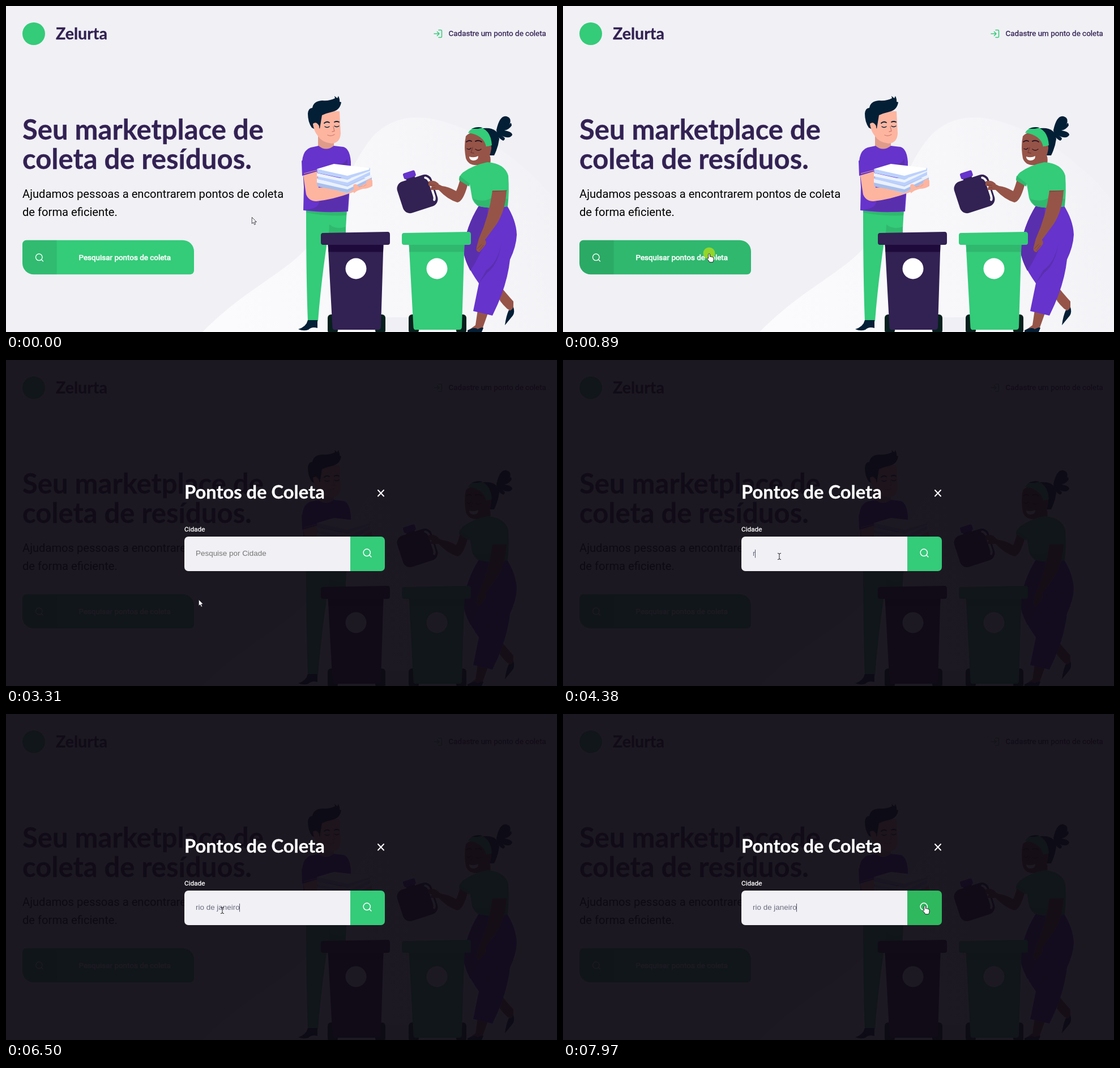
Write an HTML page that moves like this. It is 973 px wide and 576 px high and loops after 8000 ms.

```html
<!DOCTYPE html>
<html lang="pt-BR">
<head>
<meta charset="utf-8">
<title>Pontos de coleta</title>
<style>
  html, body { margin: 0; width: 100%; height: 100%; overflow: hidden; background: #f0f0f5; }
  svg { display: block; width: 100%; height: 100%; }
  text { font-family: Roboto, sans-serif; white-space: pre; }
  .title { font-family: Lato, sans-serif; font-weight: 700; fill: currentColor; stroke: currentColor; stroke-width: .3; }
  .medium { fill: currentColor; stroke: currentColor; stroke-width: .3; }
  .field { font: 13.44px "Liberation Sans", Arial, sans-serif; }
  .line { fill: none; stroke-linecap: round; stroke-linejoin: round; }
  .purple { fill: #6633cc; } .purple-dark { fill: #5a2fae; }
  .green { fill: #34cb79; } .green-dark { fill: #30b86e; }
  .plum { fill: #322153; } .navy { fill: #031f36; }
  .skin { fill: #fdb5a0; } .skin-dark { fill: #df9c8b; }
  .brown { fill: #965448; }
</style>
</head>
<body>
<svg viewBox="0 0 973 576" preserveAspectRatio="none">
  <defs>
    <linearGradient id="glow" x1="0" y1=".6" x2="1" y2=".4">
      <stop offset="0" stop-color="#fbfbfd"/>
      <stop offset=".6" stop-color="#f7f7fa"/>
      <stop offset="1" stop-color="#f2f2f6"/>
    </linearGradient>
    <g id="magnifier" class="line" stroke="#fff" stroke-width="1.4">
      <circle cx="-.7" cy="-.7" r="5.8"/><path d="M3.5 3.5 6.5 6.5"/>
    </g>
  </defs>

  <rect width="973" height="576" fill="#f0f0f5"/>
  <path fill="url(#glow)" d="M347 576C402 520 450 494 500 456C595 382 592 290 652 226C679 201 706 196 730 197C800 200 895 252 973 346V576Z"/>
  <rect x="665" y="550" width="50" height="26" fill="#efeff5"/>

  <!-- header -->
  <circle class="green" cx="49" cy="49" r="20"/>
  <text class="title" x="88" y="59" font-size="28.6" color="#322153">Zelurta</text>
  <path class="line" stroke="#34cb79" stroke-width="1.5" d="M764 42.5H768Q769.5 42.5 769.5 44V54Q769.5 55.5 768 55.5H764M756 49H765M761.5 45.5 765 49 761.5 52.5"/>
  <text class="medium" x="781.5" y="53" font-size="13.44" color="#322153">Cadastre um ponto de coleta</text>

  <!-- pitch -->
  <g font-size="49" color="#322153">
    <text class="title" x="29" y="236">Seu marketplace de</text>
    <text class="title" x="29" y="288">coleta de resíduos.</text>
  </g>
  <g font-size="20.16">
    <text x="29" y="339">Ajudamos pessoas a encontrarem pontos de coleta</text>
    <text x="29" y="371">de forma eficiente.</text>
  </g>
  <path id="searchButton" d="M36 413.7H312A20 20 0 0 1 332 433.700V467.300A7 7 0 0 1 325 474.300H49A20 20 0 0 1 29 454.300V420.700A7 7 0 0 1 36 413.700Z"/>
  <path fill="#000" opacity=".08" d="M36 413.700H89.500V474.300H49A20 20 0 0 1 29 454.300V420.700A7 7 0 0 1 36 413.700Z"/>
  <use href="#magnifier" x="59" y="444.5"/>
  <text class="medium" x="128.5" y="449" font-size="13.44" color="#fff" style="stroke-width:.6">Pesquisar pontos de coleta</text>

  <!-- man -->
  <g>
    <path class="green" d="M530 359H602L599 410H568Q556 490 551 557H533Q530 480 530 359Z"/>
    <path class="green-dark" d="M530 360H602L601 370Q565 372 530 365Z"/>
    <path class="green-dark" d="M571 386Q583 396 600 390V402H570Z"/>
    <path class="navy" d="M533 555H550V569Q540 566 534 572Q525 575 516 571Q530 567 533 555Z"/>
    <path class="skin-dark" d="M551 228H579V249Q566 260 551 249Z"/>
    <path class="skin" d="M545 196Q560 184 589 186L591 225Q590 242 575 243Q558 241 551 230Q538 214 545 196Z"/>
    <path class="navy" d="M540 215Q533 205 533 190Q534 180 541 180Q543 168 558 167Q572 168 581 163L580 159L585 163L587 159Q590 166 589 169L592 170Q590 184 576 187Q567 189 558 193L554 217Q550 207 544 207V217Z"/>
    <path class="skin" d="M542 208Q548 203 553 212L552 222Q543 221 542 208Z"/>
    <g class="line" stroke="#031f36" stroke-width="1.3">
      <path d="M563 213Q567 216 571 213M580 212Q584 215 588 212"/>
      <path d="M562 207Q566 203 571 206M580 205Q584 203 588 205" stroke-width="1.8"/>
      <path d="M568 228Q574 231 580 227M578 213L580 221 576 222" stroke="#d07e70"/>
    </g>
    <path class="purple" d="M523 274Q525 254 538 250L552 247Q565 258 579 247L596 249Q607 252 609 275V293L604 363Q562 366 525 361L526 320Z"/>
    <path class="purple-dark" d="M553 339Q580 344 604 330L603 363Q560 365 529 360Q557 358 553 339Z"/>
    <path class="purple-dark" d="M584 281Q597 281 603 270V283Z"/>
    <path class="skin" d="M524 293L549 289L552 321L609 316L643 301Q648 307 647 318Q640 323 630 323L610 330Q577 342 548 345Q535 345 530 333Z"/>
    <path class="purple" d="M522 273L549 286L550 292L523 300Z"/>
    <path fill="none" stroke="#df9c8b" d="M526 296 549 290M612 323 630 318M631 319 645 309"/>
    <path fill="#b6c8ee" d="M550 316L602 331 641 309 643 304H550Z"/>
    <path fill="#a9bfea" d="M549 310L602 322L646 302V308L603 329L550 319Z"/>
    <path fill="#eaf1ff" d="M549 305L603 319L646 299V303L603 324L549 312Z"/>
    <path fill="#bcd1fc" d="M551 299L602 310L643 292V299L603 317L550 306Z"/>
    <path fill="#edf3ff" d="M549 295L603 307L643 288V293L603 312L549 301Z"/>
    <path fill="#bcd1fc" d="M549 288L603 298L643 286V291L603 306L550 295Z"/>
    <path fill="#fff" d="M549 288L579 279L640 286Q643 287 641 289L603 300Z"/>
    <path class="skin" d="M614 322Q611 313 619 315L625 323L614 331ZM636 310Q644 302 647 309L647 318L637 321Z"/>
  </g>

  <!-- woman -->
  <g>
    <path class="brown" d="M875 497Q879 503 896 522V541L885 535Q870 521 868 511Z"/>
    <path class="navy" d="M896 532Q899 541 895 547L881 564Q883 548 888 537Q892 540 896 532Z"/>
    <path class="brown" d="M833 537L851 543L841 571Q830 576 818 572L829 564Z"/>
    <path class="navy" d="M815 573Q828 566 833 571Q842 566 843 569L840 576H815Z"/>
    <path class="purple" d="M835 353L883 350Q901 378 902 404Q901 425 890 448Q885 495 859 547L825 539L835 490Q808 452 808 430Q812 390 835 353Z"/>
    <path class="purple-dark" d="M835 353Q812 390 808 430Q808 445 820 468Q838 440 847 412Q852 380 850 353Z"/>
    <path class="purple-dark" d="M835 490L848 467Q868 454 875 419Q869 457 850 471Z"/>
    <path class="navy" d="M866 219Q872 192 884 195Q894 198 889 210Q892 203 893 211Q889 218 880 220Q894 222 894 228Q889 236 875 229Q885 234 878 238Q871 235 867 227Z"/>
    <path class="navy" d="M842 216Q869 213 871 235Q869 250 862 264H849Z"/>
    <path class="brown" d="M848 259Q858 262 855 279Q840 290 828 278Z"/>
    <path class="brown" d="M812 230Q823 218 840 225Q858 235 857 252Q854 276 835 281Q817 283 812 269Q808 248 812 230Z"/>
    <path class="green" d="M816 224Q821 215 833 214Q856 216 858 246L848 249Q844 228 816 224Z"/>
    <path class="brown" d="M847 249Q856 244 855 259Q849 268 845 262Z"/>
    <path class="navy" d="M822 217Q832 212 842 215L833 217Z"/>
    <g class="line" stroke="#2b1725" stroke-width="1.3">
      <path d="M814 252Q818 255 821 251M829 253Q834 257 839 253"/>
      <path d="M813 240Q818 236 822 239M829 239Q835 236 840 240" stroke-width="2"/>
      <path d="M824 250L821 259 826 260" stroke="#713a34"/>
    </g>
    <path fill="#fff" d="M818 266Q826 269 834 265Q834 273 825 273Q818 272 818 266Z"/>

    <path class="brown" d="M804 299Q799 318 795 327Q781 319 770 318L758 312Q747 307 746 315L748 324L764 325Q780 342 797 347Q807 346 815 317Z"/>
    <path class="green" d="M807 294Q825 281 850 276Q881 278 887 300Q889 329 886 354Q859 360 833 353Q825 347 823 339L819 315L800 308Q800 300 807 294Z"/>
    <path class="green-dark" d="M824 340Q845 349 860 337L886 341V354Q858 360 833 353Z"/>
    <path class="green-dark" d="M801 300L819 314 818 319 800 308Z"/>
    <path class="brown" d="M859 326L884 325Q882 362 866 386L846 413Q850 419 845 424L836 435Q829 434 831 426L835 411Q853 372 859 326Z"/>
    <path class="green" d="M856 300Q872 284 884 293L885 326H858Z"/>
    <path class="line" stroke="#7c4139" d="M859 328 884 326M832 429 840 421M836 432 843 423"/>
  </g>

  <!-- jug -->
  <g transform="translate(726.5 332) rotate(-18)">
    <rect class="plum" x="-32" y="-29" width="64" height="58" rx="13"/>
    <path class="line" stroke="#fff" stroke-width="4" d="M22-23Q27-20 27-12V12Q27 17 25 19"/>
    <rect class="plum" x="-11" y="-33" width="16" height="6"/>
    <rect class="purple" x="-14" y="-42" width="22" height="11" rx="3"/>
  </g>
  <path class="brown" d="M746 310Q756 306 764 314L762 325H749L752 319L746 317Z"/>
  <path class="line" stroke="#7c4139" d="M749 316 757 317M750 321 758 321"/>

  <g id="bins"></g>

  <!-- search dialog -->
  <g id="dialog">
    <rect width="973" height="576" fill="#0e0a14" opacity=".937"/>
    <text class="title" x="315" y="245" font-size="32.7" color="#fff">Pontos de Coleta</text>
    <path class="line" stroke="#fff" stroke-width="2" d="M657 230 667 240.5M667 230 657 240.5"/>
    <text class="medium" x="315" y="302.5" font-size="11.8" color="#fff">Cidade</text>
    <path fill="#f0f0f5" d="M322 312H608V373H322A7 7 0 0 1 315 366V319A7 7 0 0 1 322 312Z"/>
    <path id="goButton" d="M608 312H662A7 7 0 0 1 669 319V366A7 7 0 0 1 662 373H608Z"/>
    <use href="#magnifier" transform="translate(638 341) scale(1.06)"/>
    <text class="field" id="city" x="335" y="346"/>
    <rect id="caret" y="335" width="1" height="14.5" fill="#55556a"/>
  </g>

  <circle id="press" cx="258" cy="437" r="10.5" fill="#93d52c"/>
  <g id="cursor" stroke-linejoin="round">
    <path id="arrow" fill="#fff" stroke="#1b1822" stroke-width=".8" d="M.3.3V11.5L2.9 9.2 4.7 13.3 6.6 12.5 4.9 8.5H8.3Z"/>
    <path id="hand" fill="#fff" stroke="#111" stroke-width=".9" d="M-1.3 1.5Q0-.5 1.5 1.5V6Q3 5 4 6.2Q5.6 5.6 6.2 6.9Q8.2 6.7 8 8.5V11Q8 13 6.5 15.8H1Q-1 12.5-3.8 9.5Q-3.5 7.6-1.3 9Z"/>
    <path id="beam" fill="none" stroke="#222" d="M-3-5.5Q0-5.5 0-4Q0-5.5 3-5.5M0-4.5V4.5M-3 5.5Q0 5.5 0 4Q0 5.5 3 5.5"/>
  </g>
</svg>
<script>
const LOOP = 8000, OPEN = 1060, FOCUS = 4230, STEP = 77;
const CITY = 'rio de janeiro';
const KEYS = [4380, 4550, 4650, 5020, 5170, 5420, 5500, 5720, 5800, 5950, 6120, 6270, 6350, 6500];
const $ = id => document.getElementById(id);
const show = (id, on) => $(id).setAttribute('visibility', on ? 'inherit' : 'hidden');

const bin = (x, color, shade) => `<g transform="translate(${x} 0)">
  <rect x="12" y="545" width="18" height="34" rx="6" fill="#07201d"/>
  <rect x="96" y="545" width="18" height="34" rx="6" fill="#07201d"/>
  <path fill="${color}" d="M12.500 420H110.500L106 567Q106 572 101 572H26Q21 573 20.500 568Z"/>
  <path fill="${shade}" d="M12.500 420H110.500L110 434.500H13.500Z"/>
  <path fill="${color}" d="M4 401 118 399Q122 399 122 404V418Q122 422 118 422H4Q0 422 0 418V405Q0 401 4 401Z"/>
  <circle cx="62" cy="464" r="18.5" fill="#fff"/></g>`;
$('bins').innerHTML = bin(556, '#322153', '#1e0b3b') + bin(699, '#34cb79', '#30b86e');

const toInput = [[340, 423], [362, 400], [378, 378], [387, 358], [388, 342], [386, 343], [384, 345], [382, 347]];
const toGo = [[610, 390], [727, 406], [722, 400], [705, 385], [685, 368], [664, 352], [650, 344], [642, 340], [639, 338], [639, 338]];

const follow = (points, start, t) =>
  points[Math.min(points.length - 1, Math.floor((t - start) / STEP))];

function pointer(t) {
  if (t < 120) return [434, 373];
  if (t < 3310) {
    const k = Math.min(11, Math.floor((t - 120) / STEP) + 1) / 11;
    const e = k * k * (3 - 2 * k);
    return [434 - 176 * e, 373 + 64 * e];
  }
  return t < 7280 ? follow(toInput, 3310, t) : follow(toGo, 7280, t);
}

const inside = ([x, y], l, t, r, b) => x >= l && x < r && y >= t && y < b;

function render(t) {
  const open = t >= OPEN, at = pointer(t);
  const overSearch = !open && inside(at, 29, 414, 332, 474);
  const overGo = open && inside(at, 608, 312, 669, 373);
  const overInput = open && inside(at, 315, 312, 608, 373);

  $('searchButton').setAttribute('fill', overSearch ? '#2fb86e' : '#34cb79');
  $('goButton').setAttribute('fill', overGo ? '#2fb85e' : '#34cb79');
  show('dialog', open);
  show('press', !open && t >= 890);

  const typed = CITY.slice(0, KEYS.filter(k => t >= k).length);
  const city = $('city');
  city.textContent = typed || 'Pesquise por Cidade';
  city.setAttribute('fill', typed ? '#6c6c80' : '#757575');
  $('caret').setAttribute('x', 335 + (typed ? Math.floor(city.getComputedTextLength()) : 0));
  show('caret', t >= FOCUS && !(t >= 7050 && t < 7550));

  $('cursor').setAttribute('transform', `translate(${at.map(Math.round)})`);
  show('hand', overSearch || overGo);
  show('beam', overInput);
  show('arrow', !overSearch && !overGo && !overInput);
}

const begin = performance.now();
function tick() {
  render((performance.now() - begin) % LOOP);
  requestAnimationFrame(tick);
}
tick();
</script>
</body>
</html>
```
